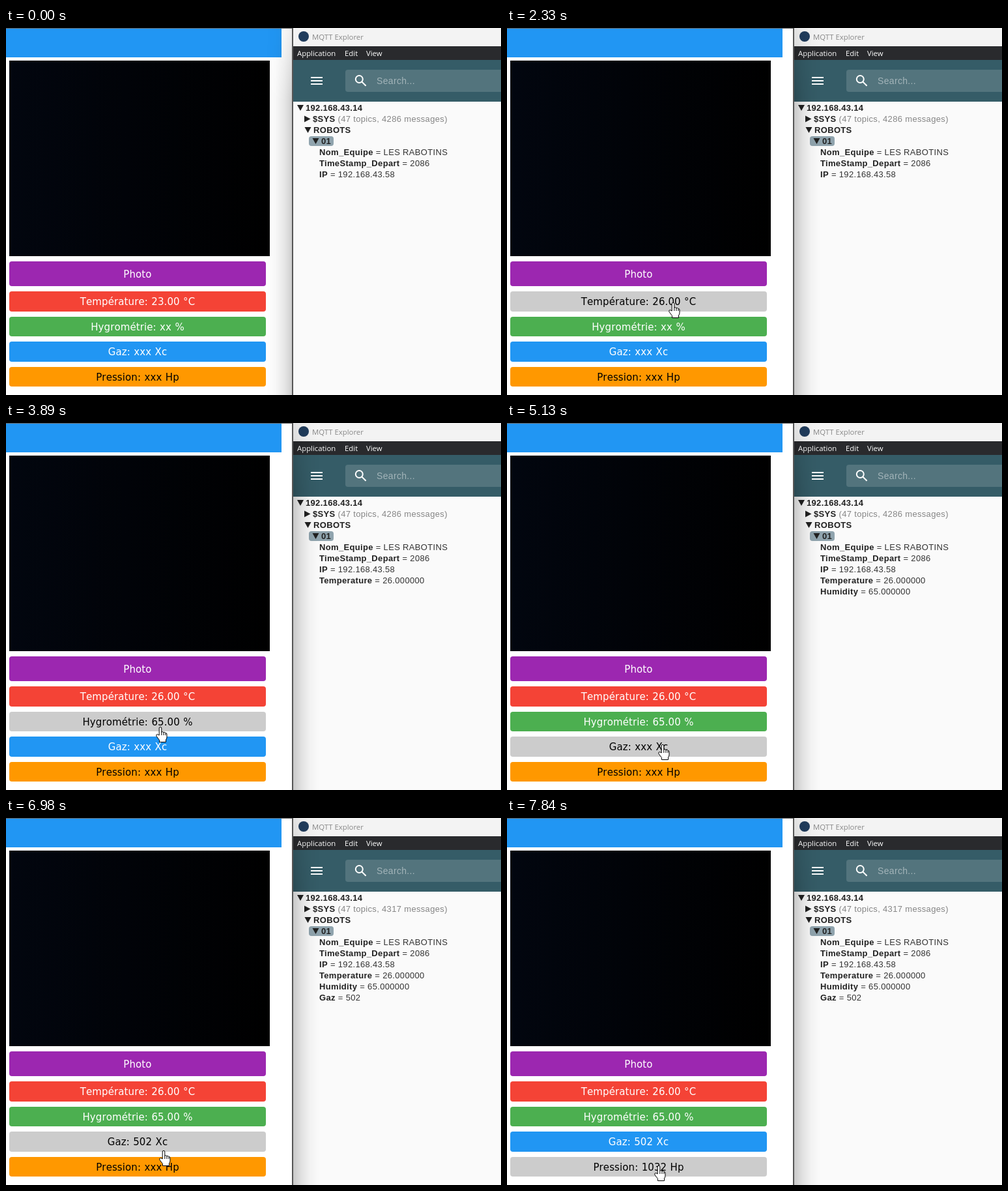
An HTML page that plays this animation: 760x563 px, repeating every 8 s.

```html
<!DOCTYPE html>
<html lang="fr">
<head>
<meta charset="utf-8">
<title>Capteurs MQTT</title>
<style>
  html, body { margin: 0; width: 100%; height: 100%; overflow: hidden; background: #fff; }
  svg { display: block; width: 100vw; height: 100vh; }
  text { white-space: pre; }
  .buttons text {
    font: 15px "DejaVu Sans", Verdana, sans-serif; font-kerning: none;
    letter-spacing: .1px; word-spacing: .5px; text-anchor: middle;
  }
  .tree { font: 13px "Liberation Sans", Arial, sans-serif; letter-spacing: .33px; fill: #212121; }
  .tree .name { font-weight: bold; }
  .chrome { font: 11.35px "Open Sans", "Noto Sans", sans-serif; }
  .search { font: 14px "Liberation Sans", Arial, sans-serif; letter-spacing: .33px; }
</style>
</head>
<body>
<svg viewBox="0 0 760 563">
  <defs>
    <linearGradient id="camera">
      <stop offset="0" stop-color="#02060f"/>
      <stop offset=".45" stop-color="#010308"/>
      <stop offset="1" stop-color="#000"/>
    </linearGradient>
    <linearGradient id="shade">
      <stop offset="0" stop-opacity=".2"/>
      <stop offset=".3" stop-opacity=".1"/>
      <stop offset=".65" stop-opacity=".03"/>
      <stop offset="1" stop-opacity="0"/>
    </linearGradient>
    <linearGradient id="fade" x2="0" y2="1">
      <stop offset="0" stop-color="#fff" stop-opacity=".35"/>
      <stop offset=".2" stop-color="#fff"/>
    </linearGradient>
    <mask id="lower"><rect width="760" height="563" fill="url(#fade)"/></mask>
  </defs>

  <g id="page">
    <rect width="440" height="563" fill="#fff"/>
    <rect y="1" width="423" height="44" fill="#2196f3"/>
    <g mask="url(#lower)">
      <rect id="leftShade" width="40" height="563" transform="matrix(-1 0 0 1 440 0)" fill="url(#shade)"/>
    </g>
    <rect x="5" y="50" width="400" height="300" fill="url(#camera)"/>
    <rect width="440" height="1" fill="#666"/>
    <g class="buttons" id="buttons"></g>
  </g>

  <g id="explorer">
    <rect x="441" width="319" height="563" fill="#fafafa"/>
    <rect x="441" width="319" height="28" fill="#f3f3f3"/>
    <circle cx="457" cy="13" r="8" fill="#203c5c"/>
    <rect x="441" y="28" width="319" height="21" fill="#292a2d"/>
    <g class="chrome">
      <text x="470" y="18" fill="#888">MQTT Explorer</text>
      <g fill="#fff">
        <text x="447" y="43">Application</text>
        <text x="520" y="43">Edit</text>
        <text x="553" y="43">View</text>
      </g>
    </g>
    <rect x="441" y="49" width="319" height="64" fill="#355c67"/>
    <rect x="521" y="64" width="250" height="34" rx="4" fill="#53747d"/>
    <path d="M468 76h18m-18 5h18m-18 5h18" stroke="#fff" stroke-width="2"/>
    <g fill="none" stroke="#fff" stroke-width="2">
      <circle cx="542.3" cy="78.5" r="5.5"/>
      <path d="M546.3 82.5l6.3 6.3"/>
    </g>
    <text class="search" x="569" y="86" fill="#a3b4b9">Search...</text>
    <g class="tree" id="tree"></g>
    <g mask="url(#lower)">
      <rect id="rightShade" x="441" width="40" height="563" fill="url(#shade)"/>
    </g>
  </g>
  <rect x="439" width="2" height="563" fill="#555"/>

  <g id="cursor" stroke="#000" stroke-linejoin="round">
    <g id="hand">
      <path fill="#fff" d="M-1.8 13V2Q-1.8 .4 0 .4T1.8 2V8Q3.5 7 5 8.6Q7 7.8 8 9.6Q10 9.4 10 11.5V16Q10 18 8.5 20V23.5H-1.5V20.5L-6 14.5Q-7 11.6 -4.4 11.6Z"/>
      <path fill="none" d="M1.8 8v5M5 9v4M8 10v3"/>
    </g>
    <path id="arrow" fill="#fff" d="M.5 .5V16.5L4 13L6.4 18.5L8.6 17.6L6.3 12.2H11.5Z"/>
    <circle id="click" r="12" stroke="none" fill="#ff0" fill-opacity=".47"/>
  </g>
</svg>
<script>
const LOOP = 8000;
const $ = id => document.getElementById(id);

function add(parent, tag, attrs, content = '') {
  const el = document.createElementNS('http://www.w3.org/2000/svg', tag);
  for (const key in attrs) el.setAttribute(key, attrs[key]);
  el.textContent = content;
  parent.append(el);
  return el;
}
const show = (el, on) => el.setAttribute('visibility', on ? 'visible' : 'hidden');

// Buttons: label changes to its second text at the given time.
const buttons = [
  { y: 358, h: 38, base: 383, fill: '#9c27b0', ink: '#fff', texts: ['Photo'] },
  { y: 404, h: 31, base: 425, fill: '#f44336', ink: '#fff', texts: ['Température: 23.00 °C', 'Température: 26.00 °C'], at: 2330 },
  { y: 443, h: 30, base: 464, fill: '#4caf50', ink: '#fff', texts: ['Hygrométrie: xx %', 'Hygrométrie: 65.00 %'], at: 3890 },
  { y: 481, h: 31, base: 502, fill: '#2196f3', ink: '#fff', texts: ['Gaz: xxx Xc', 'Gaz: 502 Xc'], at: 6000 },
  { y: 520, h: 30, base: 541, fill: '#ff9800', ink: '#000', texts: ['Pression: xxx Hp', 'Pression: 1032 Hp'], at: 7840 }
];
for (const b of buttons) {
  b.box = add($('buttons'), 'rect', { x: 5, y: b.y, width: 394, height: b.h, rx: 4 });
  b.label = add($('buttons'), 'text', { x: 202, y: b.base });
}

// Tree updates: [fade in, fade out, ramp]
const temperature = [2670, 2950, 80];
const humidity = [4140, 4430, 80];
const system = [5700, 5960, 80];
const gas = [6210, 6490, 120];
const sensors = [temperature, humidity, gas];

const rows = [
  { x: 460, name: '192.168.43.14', mark: 447, open: true, box: [441, 552], flashes: [...sensors, system] },
  { x: 471, name: '$SYS', mark: 458, value: ' (47 topics, 4286 messages)', ink: '#858585', box: [453, 681], flashes: [system] },
  { x: 472, name: 'ROBOTS', mark: 458.5, open: true, box: [453, 534], flashes: sensors },
  { x: 484, name: '01', mark: 470.5, open: true, box: [465, 503], selected: true, flashes: sensors },
  { x: 481, name: 'Nom_Equipe', value: ' = LES RABOTINS' },
  { x: 481, name: 'TimeStamp_Depart', value: ' = 2086' },
  { x: 481, name: 'IP', value: ' = 192.168.43.58' },
  { x: 481, name: 'Temperature', value: ' = 26.000000', box: [475, 646], flashes: [temperature], from: 2670 },
  { x: 481, name: 'Humidity', value: ' = 65.000000', box: [475, 623], flashes: [humidity], from: 4140 },
  { x: 481, name: 'Gaz', value: ' = 502', box: [475, 549], flashes: [gas], from: 6210 }
];
rows.forEach((row, i) => {
  const top = 115 + 17 * i;
  row.group = add($('tree'), 'g', {});
  if (row.box) {
    const area = { x: row.box[0], y: top, width: row.box[1] - row.box[0], height: 15, rx: 4 };
    if (row.selected) add(row.group, 'rect', { ...area, fill: '#90a4ae' });
    row.glow = add(row.group, 'rect', { ...area, fill: '#cfd8dc' });
  }
  if (row.mark) {
    const shape = row.open ? 'h10l-5 9z' : 'l9.5 5l-9.5 5z';
    add(row.group, 'path', { d: `M${row.mark} ${top + (row.open ? 3 : 2.5)}${shape}` });
  }
  const line = add(row.group, 'text', { x: row.x, y: top + 12 });
  add(line, 'tspan', { class: 'name' }, row.name);
  row.text = add(line, 'tspan', { fill: row.ink || '#333' }, row.value || '');
});

// Pointer hotspot: [time, x, y], each held until the next.
const path = [
  [940, 544, 546], [980, 450, 520], [1020, 350, 478], [1060, 277, 450], [1100, 259, 432],
  [1140, 253, 423], [1180, 252, 419], [1220, 253, 420], [1340, 255, 421],
  [3070, 253, 425], [3110, 251, 434], [3150, 247, 446], [3190, 243, 456], [3230, 240, 462],
  [3270, 238, 465], [3310, 237, 466],
  [4680, 237, 470], [4720, 237, 477], [4760, 237, 484], [4790, 237, 488],
  [5130, 239, 493], [5170, 239, 496], [5210, 238, 498],
  [6980, 242, 510], [7020, 242, 521], [7060, 241, 533], [7100, 239, 543], [7140, 237, 550],
  [7180, 236, 553], [7350, 235, 547], [7390, 234, 540], [7430, 233, 533]
];
const clicks = [1670, 3520, 5580, 7470];

const ramp = (t, start, length) =>
  t < start ? 0 : Math.min(1, (Math.floor((t - start) / 40) + 1) * 40 / length);

function render(t) {
  const point = path.findLast(p => p[0] <= t);
  const [, x, y] = point || [0, -99, -99];
  let hovering = false;

  for (const b of buttons) {
    const hover = x >= 5 && x < 399 && y >= b.y && y < b.y + b.h;
    hovering ||= hover;
    b.box.setAttribute('fill', hover ? '#ccc' : b.fill);
    b.label.setAttribute('fill', hover ? '#000' : b.ink);
    b.label.textContent = b.texts[t >= b.at ? 1 : 0];
  }

  $('cursor').setAttribute('transform', `translate(${x} ${y})`);
  show($('cursor'), point);
  show($('hand'), point && hovering);
  show($('arrow'), point && !hovering);
  show($('click'), clicks.some(c => t >= c && t < c + 80));

  const pageActive = t >= clicks[0];
  show($('leftShade'), !pageActive);
  show($('rightShade'), pageActive);

  for (const row of rows) {
    row.group.setAttribute('display', t >= (row.from || 0) ? 'inline' : 'none');
    if (!row.glow) continue;
    const level = row.flashes.reduce((sum, [on, off, length]) =>
      sum + ramp(t, on, length) - ramp(t, off, length), 0);
    row.glow.setAttribute('opacity', level);
  }
  rows[1].text.textContent = ` (47 topics, ${t >= system[0] ? 4317 : 4286} messages)`;
}

let start;
function tick(now) {
  start ??= now;
  render((now - start) % LOOP);
  requestAnimationFrame(tick);
}
render(0);
requestAnimationFrame(tick);
</script>
</body>
</html>
```
